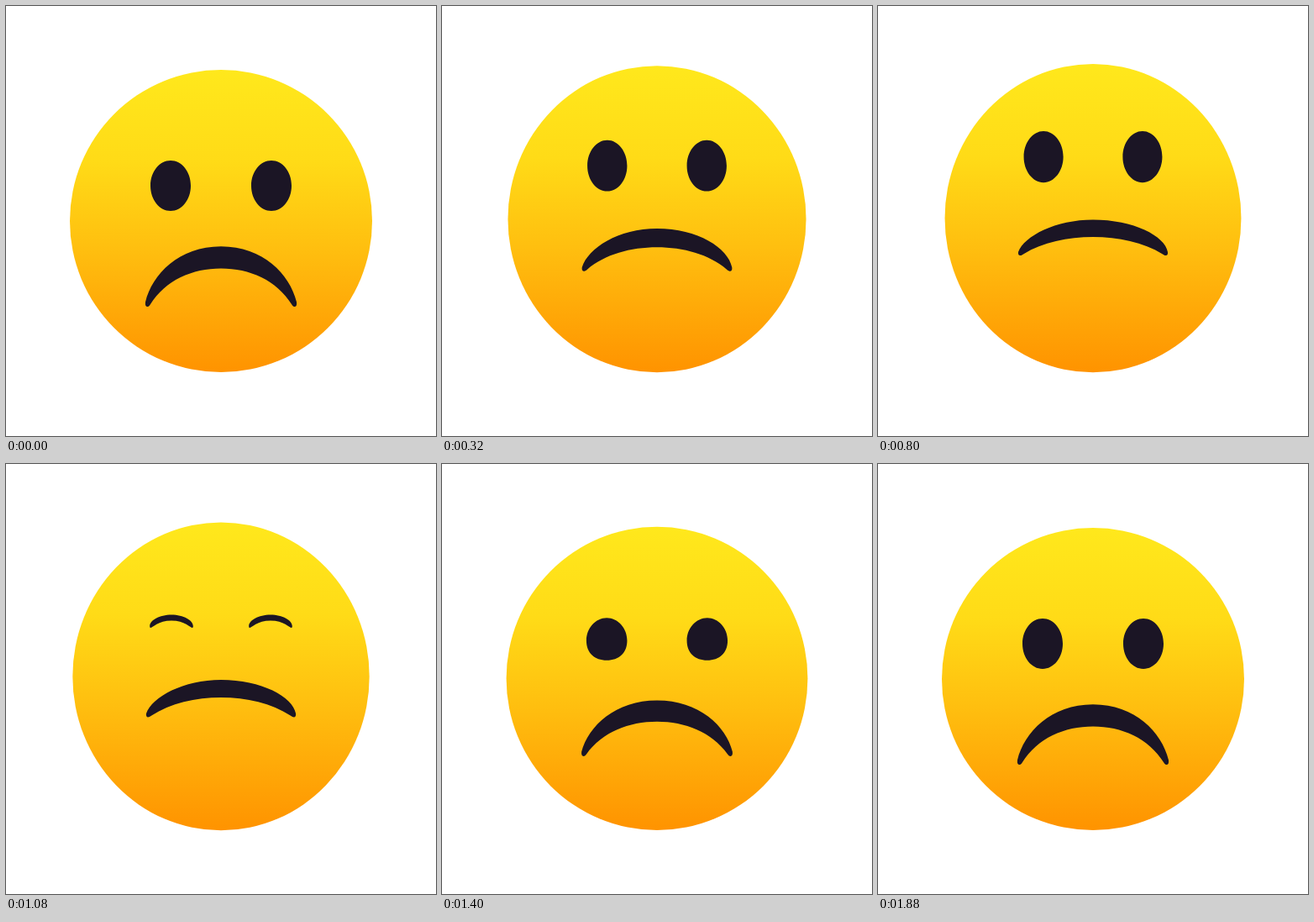
An HTML page with a canvas that plays this animation: 512 by 512 pixels, repeating every 1.92 s.

```html
<!DOCTYPE html>
<html lang="en">
<head>
<meta charset="utf-8">
<title>Sad face</title>
<style>
  html, body { margin: 0; width: 100%; height: 100%; overflow: hidden; background: #fff; }
  canvas { display: block; width: 512px; height: 512px; }
</style>
</head>
<body>
<canvas id="stage" width="512" height="512"></canvas>
<script>
const ctx = document.getElementById('stage').getContext('2d');
const LOOP = 1920, HALF = 960, STEP = 40, BLINK = 800;
const MID = 256, BASE = 436, INK = '#1b1525';
const ROUND = 0.5523; // handle length that makes a cubic follow a quarter circle

const mix = (a, b, k) => a + (b - a) * k;

// Cubic timing curve with handles (1/3, 0) and (0, 1)
function ease(u) {
  if (u <= 0) return 0;
  if (u >= 1) return 1;
  let lo = 0, hi = 1;
  for (let i = 0; i < 30; i++) {
    const s = (lo + hi) / 2;
    if (s * (1 - s) ** 2 + s ** 3 < u) lo = s; else hi = s;
  }
  return lo * lo * (3 - 2 * lo);
}

function drawHead(lift) {
  const rx = mix(180, 176.4, lift), top = mix(76, 69, lift);
  const bottom = BASE + 0.3 * lift, ry = (bottom - top) / 2;
  const g = ctx.createLinearGradient(0, top, 0, bottom);
  g.addColorStop(0, '#ffe81c');
  g.addColorStop(0.3, '#ffdb17');
  g.addColorStop(0.6, '#ffbe0f');
  g.addColorStop(1, '#ff9300');
  ctx.fillStyle = g;
  ctx.beginPath();
  ctx.ellipse(MID, bottom - ry, rx, ry, 0, 0, Math.PI * 2);
  ctx.fill();
}

// An oval that flattens into a drooping lid as shut goes to 1
function drawEye(x, y, lift, shut) {
  const w = mix(24 * mix(1, 0.98, lift), 26, shut);
  const h = 30 * mix(1, 1.02, lift) * (1 - shut);
  const side = y + 12 * shut, reach = ROUND * h + 6 * shut;
  const top = y - h, low = y + h + 2 * shut;
  const crown = ROUND * w, sole = crown + 6 * shut;
  ctx.beginPath();
  for (const d of [-1, 1]) {
    ctx.moveTo(x, top);
    ctx.bezierCurveTo(x + d * crown, top, x + d * w, side - reach, x + d * w, side);
    ctx.bezierCurveTo(x + d * w, side + reach, x + d * sole, low, x, low);
  }
  ctx.fill();
}

function drawEyes(lift, shut) {
  const gap = mix(60, 58.9, lift), y = mix(214, 179.2, lift);
  for (const d of [-1, 1]) drawEye(MID + d * gap, y, lift, shut);
}

function drawMouth(lift) {
  const m = (a, b) => mix(a, b, lift);
  const sag = 4 * lift * (1 - lift), skew = 2 * lift;
  const top = m(286.2, 254) + sag, low = m(312.5, 274.6) + sag;
  const end = m(352.5, 292.3), tip = m(355.5, 294.5);
  ctx.beginPath();
  for (const d of [-1, 1]) {
    const x = v => MID + d * v;
    ctx.moveTo(MID, top);
    ctx.bezierCurveTo(x(m(50, 46)) + skew, top, x(m(82, 84)) + skew, mix(end, top, 0.5), x(m(90, 89)), end);
    ctx.bezierCurveTo(x(m(91, 89.5)), end + m(6, 4.3), x(87), tip + m(4.5, 3.2), x(m(84.3, 82.5)), tip);
    ctx.bezierCurveTo(x(m(66, 60)), mix(tip, low, 0.68), x(m(34, 30)), low, MID, low);
  }
  ctx.fill();
}

function draw(t) {
  const rising = t < HALF;
  const lift = rising ? ease(t / HALF) : 1 - ease((t - HALF) / HALF);
  const k = Math.max(0, (t - BLINK) / (HALF - BLINK));
  const shut = rising ? k * k * (3 - 2 * k) : lift;
  ctx.fillStyle = '#fff';
  ctx.fillRect(0, 0, 512, 512);
  drawHead(lift);
  ctx.fillStyle = INK;
  drawEyes(lift, shut);
  drawMouth(lift);
}

const start = performance.now();
function tick() {
  const t = (performance.now() - start) % LOOP;
  draw(Math.floor(t / STEP) * STEP);
  requestAnimationFrame(tick);
}
tick();
</script>
</body>
</html>
```
